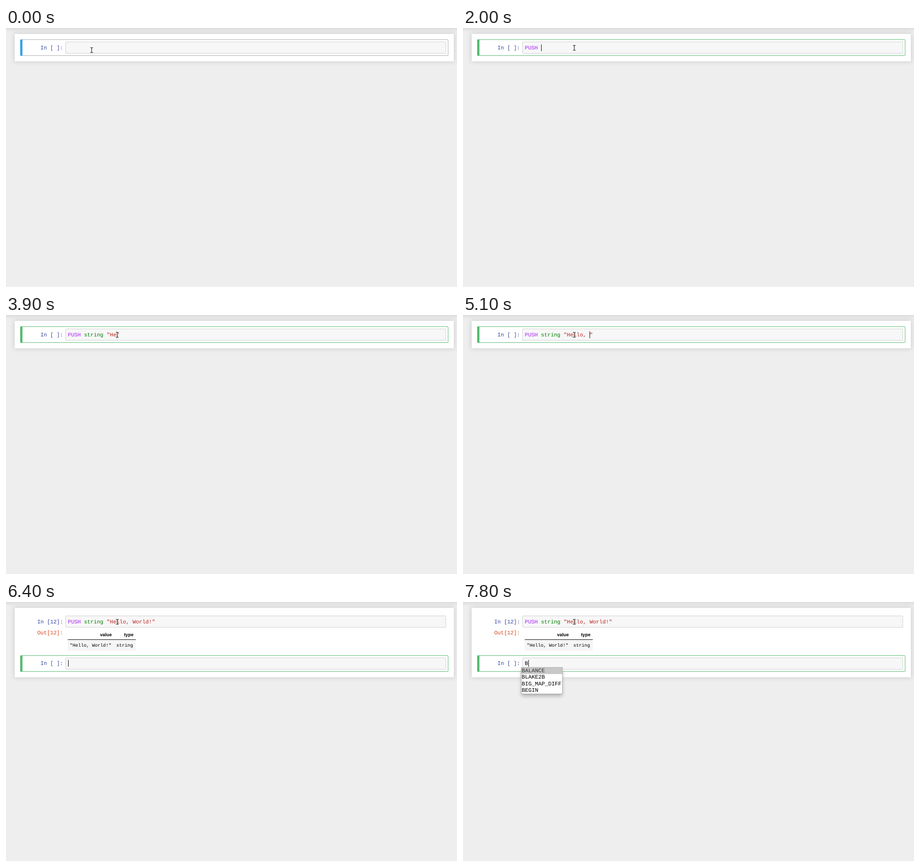
These frames come from a looping animation (987 px wide and 568 px high, 8 s). An HTML page:

```html
<!DOCTYPE html>
<html lang="en">
<head>
<meta charset="utf-8">
<title>Notebook session</title>
<style>
html, body { margin: 0; width: 100%; height: 100%; overflow: hidden; background: #eee; }
div { position: absolute; box-sizing: border-box; }
.bar { left: -20px; right: -20px; top: -20px; height: 20px; }
.page { left: 19px; width: 961px; top: 13px; background: #fff; }
.bar, .page { box-shadow: 0 0 10px 1px rgba(87, 87, 87, .2); }
.cell { left: 31px; width: 937px; height: 36px; border: 1px solid #ababab; border-radius: 2px; }
.cell::before { content: ""; position: absolute; left: -1px; top: -1px; width: 5px; height: 36px;
  background: #36a5ea; border-radius: 2px 0 0 2px; }
.cell.edit { border-color: #55bb70; }
.cell.edit::before { background: #55bb70; }
.input { left: 130px; width: 833px; height: 26px; background: #f7f7f7;
  border: 1px solid #cfcfcf; border-radius: 2px; }
.row { left: 135px; top: 83px; width: 149px; height: 24px; background: #f5f5f5; }
.rule { left: 135px; top: 82px; width: 149px; height: 1px; background: #000; }
.menu { left: 127px; top: 143px; width: 91px; height: 59px; background: #fff;
  border: 1px solid #ababab; box-shadow: 0 5px 8px -1px #adadad; }
.pick { left: 0; top: 0; width: 89px; height: 14px; background: #c8c8c8; }
.caret { width: 1px; height: 15px; background: #000; }
svg { position: absolute; left: 0; top: 0; }
text { font: 11.8px "Liberation Mono", monospace; white-space: pre; text-rendering: geometricPrecision; }
.in { fill: #303f9f; }
.out { fill: #d84315; }
.key { fill: #a2f; }
.kind { fill: #008000; }
.str { fill: #ba2121; }
.small { font-size: 10.1px; }
.head { font: bold 10.1px "Liberation Sans", Arial, sans-serif; text-anchor: end; }
.option { font-size: 12.1px; }
</style>
</head>
<body>
<div class="bar"></div>
<div class="page" id="page"></div>
<div class="cell" id="cell"></div>
<div class="input" style="top:30px"></div>
<div id="result">
  <div class="input" style="top:122px"></div>
  <div class="row"></div>
  <div class="rule"></div>
</div>
<div class="menu" id="menu"><div class="pick"></div></div>
<svg width="987" height="568">
  <text class="in" id="prompt" y="47"></text>
  <text id="code" x="135.3" y="47"><tspan id="word"></tspan><tspan id="kind"></tspan><tspan class="str" id="str"></tspan></text>
  <g id="output">
    <text class="out" x="68.4" y="71">Out[12]:</text>
    <text class="head" x="231.5" y="75.3">value</text>
    <text class="head" x="279" y="75.3">type</text>
    <text class="small" x="139.7" y="98">"Hello, World!"</text>
    <text class="small" x="241.6" y="98">string</text>
    <text class="in" x="75.4" y="138">In [ ]:</text>
    <text id="next" x="135.3" y="138">B</text>
  </g>
  <g id="options">
    <text class="option" x="128.4" y="154" fill="#333">BALANCE</text>
    <text class="option" x="128.4" y="168">BLAKE2B</text>
    <text class="option" x="128.4" y="182.5">BIG_MAP_DIFF</text>
    <text class="option" x="128.4" y="197">BEGIN</text>
  </g>
</svg>
<div class="caret" id="caret"></div>
<svg width="987" height="568">
  <g id="mouse" fill="none">
    <path id="beam" d="M-3-5.5H-1.5L0-4.5 1.5-5.5H3M0-4.5V4.5M-3 5.5H-1.5L0 4.5 1.5 5.5H3" stroke="#fff" stroke-width="2.6"/>
    <use href="#beam"/>
    <path d="M-3-5.5H-1.5L0-4.5 1.5-5.5H3M0-4.5V4.5M-3 5.5H-1.5L0 4.5 1.5 5.5H3" stroke="#000" stroke-width="1.1"/>
  </g>
</svg>
<script>
const LOOP = 8000, RUN = 6400, ADVANCE = 7.08;
const LINE = 'PUSH string "Hello, World!';
const $ = id => document.getElementById(id);

// [time, characters typed]
const typing = [
  [0, 0], [800, 1], [1100, 2], [1200, 3], [1500, 4], [2000, 5], [2200, 7], [2400, 8],
  [2700, 11], [3000, 12], [3200, 13], [3700, 14], [3900, 15], [4100, 16], [4300, 17],
  [4500, 18], [4900, 19], [5100, 20], [5300, 22], [5500, 23], [5700, 25], [6200, 26]
];
// [time, caret visible]
const blink = [[0, false], [100, true], [600, false], [800, true], [7000, false], [7400, true]];
// [time, x, y]
const pointer = [[0, 187.5, 48.5], [100, 236.5, 43.5], [200, 243.5, 43.5]];

const at = (steps, t) => steps.filter(s => s[0] <= t).pop();
const show = (id, on) => { $(id).style.visibility = on ? "visible" : "hidden"; };

function draw(t) {
  const done = t >= RUN;
  const count = at(typing, t)[1];
  const text = LINE.slice(0, count);
  const chars = done ? +(t >= 7600) : count;
  const [, mx, my] = at(pointer, t);

  $("page").style.height = (done ? 152 : 60) + "px";
  $("cell").style.top = (done ? 117 : 26) - (done ? 0 : 1) + "px";
  $("cell").className = t >= 100 ? "cell edit" : "cell";
  $("prompt").textContent = done ? "In [12]:" : "In [ ]:";
  $("prompt").setAttribute("x", done ? 68.4 : 75.4);

  $("word").textContent = text.slice(0, 5);
  $("word").setAttribute("class", count > 3 ? "key" : "");
  $("kind").textContent = text.slice(5, 12);
  $("kind").setAttribute("class", count > 10 ? "kind" : "");
  $("str").textContent = count > 12 ? text.slice(12) + '"' : "";

  show("result", done);
  show("output", done);
  show("next", t >= 7600);
  show("menu", t >= 7800);
  show("options", t >= 7800);
  show("caret", at(blink, t)[1]);
  $("caret").style.left = Math.round(135.6 + chars * ADVANCE) + "px";
  $("caret").style.top = (done ? 127 : 36) + "px";
  $("mouse").setAttribute("transform", `translate(${mx} ${my})`);
}

const start = performance.now();
function tick(now) {
  draw(Math.max(0, now - start) % LOOP);
  requestAnimationFrame(tick);
}
draw(0);
requestAnimationFrame(tick);
</script>
</body>
</html>
```
